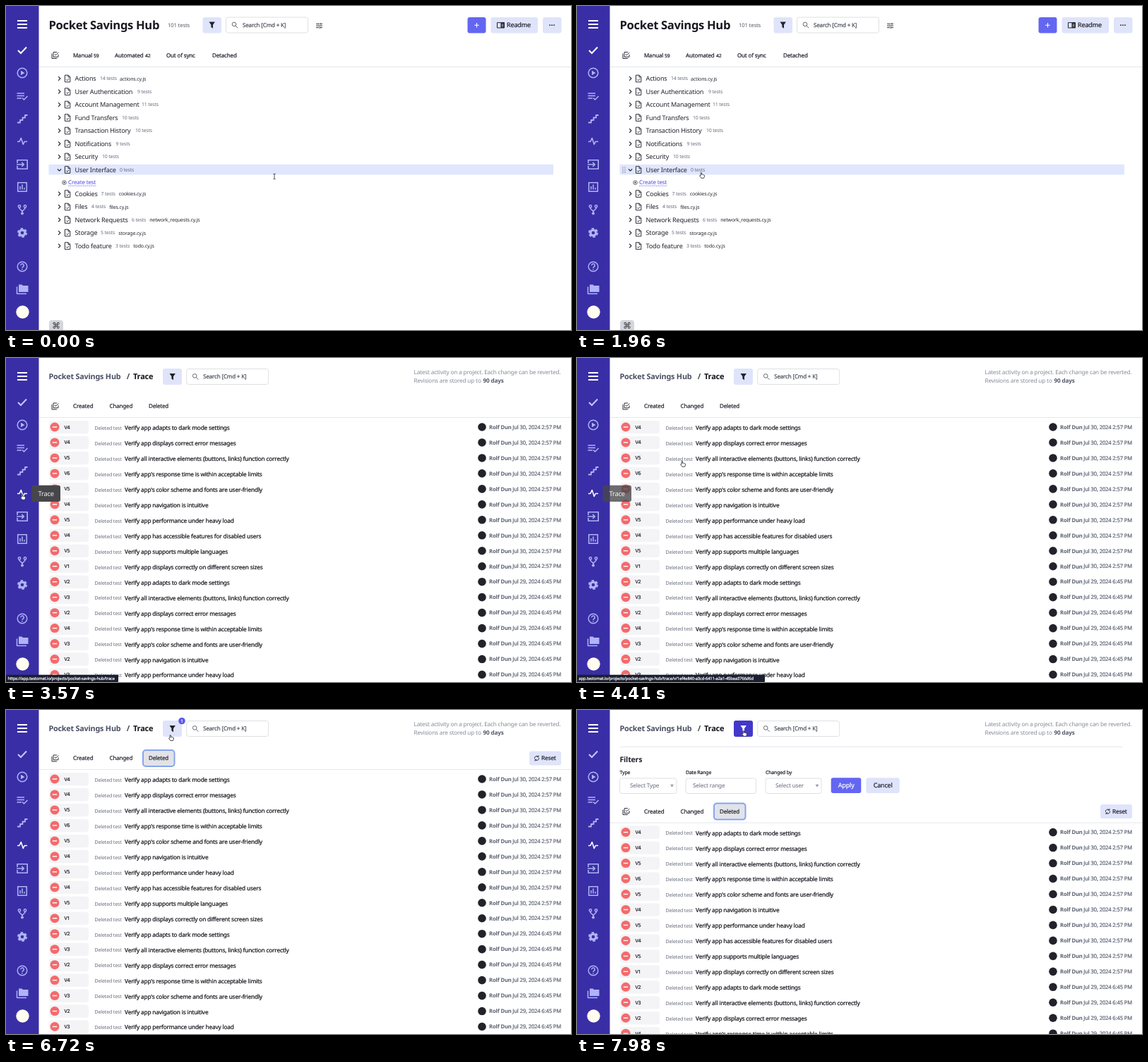
These frames come from a looping animation (800 by 460 pixels, 8 s). An HTML page:

```html
<!DOCTYPE html>
<html lang="en">
<head>
<meta charset="utf-8">
<title>Test project activity</title>
<style>
  html, body { margin: 0; width: 100%; height: 100%; overflow: hidden; background: #fff; }
  svg { display: block; width: 100%; height: 100%; }
  text { font-family: "Noto Sans", "Open Sans", sans-serif; letter-spacing: -.02em; white-space: pre; text-rendering: geometricPrecision; }
</style>
</head>
<body>
<svg id="stage" viewBox="0 0 800 460"></svg>
<script>
const LOOP = 8000, PANEL_SHIFT = 75.6;
const INK = '#22242e', GRAY = '#666b7c', PALE = '#dfe4fb', INDIGO = '#6366f1', LILAC = '#aeb4f6', LINE = '#e3e5ea';
const PROJECT = 'Pocket Savings Hub', PAGE = 'Trace';
const ADDRESS = 'app.testomat.io/projects/pocket-savings-hub/trace';

// y is the optical middle of the line; a hairline stroke gives the medium weight
const text = (x, y, size, str, fill = INK, weight = 400, anchor = 'start') =>
  `<text x="${x}" y="${y + size * .36}" font-size="${size}" fill="${fill}" font-weight="${weight === 500 ? 400 : weight}"
    text-anchor="${anchor}" ${weight === 500 ? `stroke="${fill}" stroke-width=".22"` : ''}>${str}</text>`;
const rect = (x, y, right, bottom, fill, r = 0, extra = '') =>
  `<rect x="${x}" y="${y}" width="${right - x}" height="${bottom - y}" rx="${r}" fill="${fill}" ${extra}/>`;
const circle = (x, y, r, fill, extra = '') => `<circle cx="${x}" cy="${y}" r="${r}" fill="${fill}" ${extra}/>`;
const stroke = (d, color = INK, width = 1) =>
  `<path d="${d}" fill="none" stroke="${color}" stroke-width="${width}" stroke-linejoin="round"/>`;
const solid = (d, fill) => `<path d="${d}" fill="${fill}"/>`;
const at = (x, y, body) => `<g transform="translate(${x} ${y})">${body}</g>`;
const group = (id, body) => `<g id="${id}">${body}</g>`;
const box = (x, y, right, bottom) => rect(x, y, right, bottom, '#fff', 3, 'stroke="#d6d8de" stroke-width=".8"');

const funnel = (x, y, fill) => at(x, y, solid('M-4.2-4.5H4.2L1.3-.3V4.8L-1.3 3V-.3Z', fill));
const search = (x, y) => box(x, y - 11, x + 116, y + 11) +
  at(x + 12.5, y, stroke('M1.2 1.2L4.2 4.2M1.8-1.1A2.8 2.8 0 1 1-3.8-1.1A2.8 2.8 0 1 1 1.8-1.1', '#555', .9)) +
  text(x + 23.5, y, 8, 'Search [Cmd + K]', '#4c505c', 500);
const checklist = (x, y) => at(x, y,
  stroke('M-4.5-2.5V4.5H2.5M4.5-1V2.3H-2.4V-4.5H2.5M-.7-1.5L1-.2L4.8-4', INK, .95));
const tab = (x, y, label) => text(x, y, 8, label, INK, 500);

function sidebar() {
  const icon = (y, d, width = 1.5) => at(23, y, stroke(d, LILAC, width));
  return rect(0, 0, 46.5, 460, '#3a2ea6') +
    at(23, 26, stroke('M-7-5H7M-7 0H7M-7 5H7', '#fff', 1.9)) +
    at(23, 63, `<path id="checkIcon" d="M-6 0L-2 4L6-4.5" fill="none" stroke-width="2"/>`) +
    icon(95, 'M6.8 0A6.8 6.8 0 1 1-6.8 0A6.8 6.8 0 1 1 6.8 0') + at(23, 95, solid('M-2-3.3L3.5 0L-2 3.3Z', LILAC)) +
    icon(128, 'M-7.5-4H3M-7.5-.5H3M-7.5 3H-1M0 2.5L2.5 5L7.5 0') +
    icon(160, 'M-7 5.5H-3V2H0.5V-1.5H4V-5H7.5', 1.8) +
    at(23, 192, `<path id="pulseIcon" d="M-7 .5H-4L-1.7-4.5L1.3 4.5L3.2 .5H7" fill="none" stroke-width="1.6" stroke-linejoin="round"/>`) +
    icon(225, 'M-7-2V-6.3H7.2V6.3H-7V2M-8 0H2M-.8-3L2.3 0L-.8 3', 1.6) +
    icon(257, 'M-6.3-6.3H6.3V6.3H-6.3ZM-3 3.5V-1M0 3.5V-3.5M3 3.5V1') +
    icon(289, 'M0 7V2.5L-4-1.5V-4M0 2.5L4-1.5V-4') +
    at(23, 289, circle(-4, -4.5, 1.7, '#3a2ea6', `stroke="${LILAC}" stroke-width="1.4"`) +
      circle(4, -4.5, 1.7, '#3a2ea6', `stroke="${LILAC}" stroke-width="1.4"`) + circle(0, 5.5, 1.9, LILAC)) +
    at(23, 322, circle(0, 0, 3.9, 'none', `stroke="${LILAC}" stroke-width="3.2"`) +
      circle(0, 0, 6, 'none', `stroke="${LILAC}" stroke-width="2" stroke-dasharray="3.4 2.883"`)) +
    icon(370, 'M6.8 0A6.8 6.8 0 1 1-6.8 0A6.8 6.8 0 1 1 6.8 0M-2.2-1.6A2.2 2.2 0 1 1 .8 .3Q0 .8 0 2M0 3V4.4', 1.4) +
    at(23, 402, solid('M-5-6.5H-.5L1-5H8.5V4H-5Z', LILAC) + stroke('M-7.5-3.5V6.5H6', LILAC, 1.5)) +
    circle(23.5, 434.5, 9.2, '#fffdf0');
}

const suites = [
  ['Actions', 14, 133, 'actions'], ['User Authentication', 9, 186], ['Account Management', 11, 192],
  ['Fund Transfers', 10, 164], ['Transaction History', 10, 183], ['Notifications', 9, 155.5],
  ['Security', 10, 136], ['User Interface', 0, 161], ['Cookies', 7, 134.5, 'cookies'], ['Files', 4, 121, 'files'],
  ['Network Requests', 6, 178, 'network_requests'], ['Storage', 5, 134, 'storage'], ['Todo feature', 3, 155, 'todo']];

function suiteRow([name, count, countX, file], i) {
  const y = 103 + 18.5 * i + (i > 7 ? 15.5 : 0);
  const chevron = i === 7 ? 'M-2.6-1L0 1.6L2.6-1' : 'M-1.4-2.8L1.4 0L-1.4 2.8';
  return at(75.5, y, stroke(chevron, INK, 1.1)) +
    at(87, y, stroke('M-3.6-4.8H1.2L3.8-2.2V4.9H-3.6ZM1-4.6V-2H3.6M-1.7 1.4L-.3 2.8L2.1 .2', INK, .95)) +
    text(97.5, y, 9.1, name) + text(countX, y, 6.9, count + ' tests', GRAY) +
    (file ? text(countX + (count > 9 ? 28 : 25.2), y, 7, file + '.cy.js') : '');
}

function testsPage() {
  return text(60.5, 27, 16.6, PROJECT, '#191a22', 600) + text(229, 27.5, 7.7, '101 tests', '#555a66') +
    rect(278.5, 16, 305, 38.5, PALE, 3) + funnel(291.7, 27, INK) + search(311.5, 27) +
    at(443.5, 28, stroke('M-4.5-2.7H.5M2.5-2.7H4.5M-4.5 0H-2.5M-.5 0H4.5M-4.5 2.7H-.5M1.5 2.7H4.5M1.8-4V-1.4M-1.5-1.3V1.3M.8 1.4V4', INK, .9)) +
    rect(653.5, 16, 679.5, 38.5, INDIGO, 3) + at(666.5, 27.2, stroke('M-3.3 0H3.3M0-3.3V3.3', '#fff', 1.1)) +
    rect(686.5, 16, 753, 38.5, PALE, 3) + at(700.5, 27.2,
      stroke('M-5-3.6H5V3.8H-5Z', INK, 1) + solid('M0-3.6H5V3.8H0Z', INK) + stroke('M1.3-1.3H4M1.3 .3H4M1.3 1.9H4', '#fff', .6)) +
    text(709, 27, 9.1, 'Readme', INK, 500) +
    rect(760, 16, 786.5, 38.5, PALE, 3) + [-3, 0, 3].map(d => circle(773 + d, 27.2, .9, INK)).join('') +
    checklist(69.5, 70) + tab(95, 70, 'Manual') + text(124, 70.3, 6.8, '59', INK, 500) +
    tab(154, 70, 'Automated') + text(197, 70.3, 6.8, '42', INK, 500) + tab(227, 70, 'Out of sync') + tab(292, 70, 'Detached') +
    stroke('M47 86.5H800', LINE, .9) + rect(60.5, 225, 775, 239.5, '#e0e6fd') +
    suites.map(suiteRow).join('') +
    group('handle', [0, 1, 2, 3].map(k => circle(65, 229.2 + 2.4 * k, .65, GRAY) + circle(68, 229.2 + 2.4 * k, .65, GRAY)).join('')) +
    circle(82.5, 250.7, 2.8, 'none', `stroke="${INK}" stroke-width=".7"`) + at(82.5, 250.7, stroke('M-1.5 0H1.5M0-1.5V1.5', INK, .7)) +
    text(88, 250.3, 8.05, 'Create test', '#4f46e5') +
    '<path d="M88 255.3H127.5" stroke="#4f46e5" stroke-width=".7" stroke-dasharray="1 .6"/>' +
    rect(61, 446, 81, 464, '#d3d6dc', 4) +
    '<text x="71" y="458" font-size="12" text-anchor="middle" fill="#333" style="font-family:\'DejaVu Sans\',sans-serif">⌘</text>';
}

const checks = {
  d: 'adapts to dark mode settings', e: 'displays correct error messages', n: 'navigation is intuitive',
  p: 'performance under heavy load', a: 'has accessible features for disabled users',
  l: 'supports multiple languages', s: 'displays correctly on different screen sizes' };
const titles = {
  i: 'Verify all interactive elements (buttons, links) function correctly',
  r: "Verify app's response time is within acceptable limits",
  c: "Verify app's color scheme and fonts are user-friendly" };
const rowKinds = 'deircnpalsdiercnp', versions = '44565454512324323';

function activityRow(kind, i) {
  const y = 98 + 21.97 * i;
  return rect(61, y - 9, 117, y + 9.3, '#f4f4f6', 4) + circle(69, y, 6.5, '#f46a6c') +
    at(69, y, stroke('M-3.2 0H3.2', '#fff', 1.4)) + text(82.5, y, 7, 'V' + versions[i], INK, 500) +
    text(125.5, y + 1.3, 7, 'Deleted test', GRAY) +
    text(168, y + 1, 8.27, titles[kind] || 'Verify app ' + checks[kind], '#15161c', 500) +
    circle(674, y, 5.8, '#22232a') + text(684, y, 7.7, 'Rolf Dun', '#5a6070', 600) +
    text(786, y, 7.65, `Jul ${i < 10 ? '30, 2024 2:57' : '29, 2024 6:45'} PM`, '#5f6475', 500, 'end');
}

function filterPanel() {
  const caret = x => at(x, 107.5, solid('M-2.4-1.8H2.4L0 2.2Z', '#999ca6'));
  return stroke('M61 52.3H773', LINE, .9) + text(60.5, 70.5, 10.6, 'Filters', INK, 600) +
    text(60.5, 89, 6.9, 'Type', INK, 500) + text(154, 89, 6.9, 'Date Range', INK, 500) + text(267, 89, 6.9, 'Changed by', INK, 500) +
    box(60.5, 97, 141, 118.5) + box(154, 97, 253.5, 118.5) + box(267, 97, 346, 118.5) +
    text(75, 107.5, 8.2, 'Select Type', GRAY) + text(164, 107.5, 8.2, 'Select range', GRAY) + text(281, 107.5, 8.2, 'Select user', GRAY) +
    caret(134.5) + caret(340) +
    rect(359.7, 96.2, 402.3, 118, INDIGO, 3) + text(381.2, 107, 9, 'Apply', '#fff', 500, 'middle') +
    rect(409.3, 96.2, 456.7, 118, PALE, 3) + text(433.2, 107, 9, 'Cancel', INK, 500, 'middle');
}

function activityPage() {
  const filtered = rect(194, 57, 238.5, 80, '#e2e3e8', 4, 'stroke="#86a5f0" stroke-width="2"') +
    rect(741, 58.5, 786, 78.5, PALE, 3) +
    at(751.5, 68.5, stroke('M-3 .6A3 3 0 0 1 2-2.2M3-.6A3 3 0 0 1-2 2.2M2.4-4V-1.9H.3M-2.4 4V1.9H-.3', INK, .95)) +
    text(758, 68.5, 8.3, 'Reset', INK, 500);
  return text(60.5, 26.3, 10.8, PROJECT, '#4b5063', 600) + text(171, 26.3, 11, '/', INK, 500) +
    text(180, 26.3, 11, PAGE, '#15161c', 600) +
    group('focus', rect(221, 14, 250.5, 39, 'none', 4, 'stroke="#dcdee6"')) +
    rect(222, 15, 249, 38, PALE, 3) + funnel(235.7, 26.5, INK) +
    group('filterOn', rect(222, 15, 249, 38, '#4338ca', 3) + funnel(235.7, 26.5, '#fff')) +
    search(255.7, 26.5) +
    group('badge', circle(249, 15.5, 4.8, '#5b5be8') + text(249, 15.5, 6.2, '1', '#fff', 500, 'middle')) +
    text(577.5, 20.3, 8.2, 'Latest activity on a project. Each change can be reverted.', '#858a98') +
    text(577.5, 32.5, 8.2, 'Revisions are stored up to', '#858a98') + text(675.5, 32.5, 8.2, '90 days', '#555a6b', 600) +
    group('panel', filterPanel()) +
    group('list', group('filtered', filtered) + checklist(69.5, 68.5) +
      tab(95, 68.3, 'Created') + tab(146.5, 68.3, 'Changed') + tab(202, 68.3, 'Deleted') +
      stroke('M47 84.5H800', LINE, .9) + [...rowKinds].map(activityRow).join(''));
}

const statusBar = (id, width, str) => group(id, rect(0, 449.7, width, 460, '#1b1f30', 1) + text(2.5, 455, 5.8, str, '#fff', 500));

document.getElementById('stage').innerHTML =
  group('tests', testsPage()) + group('activity', activityPage()) + sidebar() +
  statusBar('pageLink', 159, 'https://' + ADDRESS) +
  statusBar('rowLink', 266, ADDRESS + '/v/1ef4e840-a3cd-6411-a2a1-45bea3766d6d') +
  statusBar('hashLink', 162, 'https://' + ADDRESS + '#') +
  group('tooltip', rect(36.3, 180.7, 77, 204, '#47474b', 3) + text(56.7, 192.3, 9.4, PAGE, '#f2f2f2', 400, 'middle')) +
  '<circle id="ripple" fill="#7d95f2" fill-opacity=".38" stroke="#7890ea" stroke-width="1"/>' +
  group('cursor',
    group('beam', stroke('M-1.6-3.8Q0-3.8 0-2.8Q0-3.8 1.6-3.8M0-2.8V2.8M-1.6 3.8Q0 3.8 0 2.8Q0 3.8 1.6 3.8', '#222', .8)) +
    group('hand', '<path d="M-1.9 .8V-3.2Q-1.2-4.4-.5-3.2V-.8Q.4-1.4 1-.5Q1.9-1 2.3-.1Q3.5-.3 3.5 .8Q3.6 2.8 2.6 4.3H-1.2Q-2 2.8-3.4 1.2Q-3.3 .1-1.9 .8Z" fill="#fff" stroke="#222" stroke-width=".8" stroke-linejoin="round"/>'));

const el = id => document.getElementById(id);
const show = (id, on) => { el(id).style.display = on ? '' : 'none'; };
const clamp = v => Math.max(0, Math.min(1, v));
const ramp = (t, from, to) => clamp((t - from) / (to - from));

// time, x, y of the pointer
const pointerPath = [[0, 380, 242], [1960, 177, 240], [2450, 24, 197], [4200, 24, 197], [4410, 150, 150],
  [4900, 216, 75], [6160, 216, 75], [6900, 237, 33]];

function pointerAt(t) {
  const next = pointerPath.findIndex(key => key[0] > t);
  if (next < 0) return pointerPath.at(-1).slice(1);
  const [t0, x0, y0] = pointerPath[next - 1], [t1, x1, y1] = pointerPath[next];
  const p = ramp(t, t0, t1), eased = p * p * (3 - 2 * p);
  return [x0 + (x1 - x0) * eased, y0 + (y1 - y0) * eased];
}

function render(t) {
  const during = (from, to = LOOP) => t >= from && t < to;
  const onActivity = t >= 3220, panelOpen = t >= 7840;
  show('tests', !onActivity);
  show('activity', onActivity);
  show('handle', during(700, 2150));
  show('filtered', t >= 5390);
  show('badge', during(5390, 7840));
  show('focus', during(7560, 7840));
  show('filterOn', panelOpen);
  show('panel', panelOpen);
  el('list').setAttribute('transform', `translate(0 ${panelOpen ? PANEL_SHIFT : 0})`);
  show('pageLink', during(2450, 4270));
  show('rowLink', during(4340, 4620));
  show('hashLink', during(4760, 6230));
  el('checkIcon').setAttribute('stroke', onActivity ? '#c3c7fa' : '#fff');
  el('pulseIcon').setAttribute('stroke', t >= 2450 ? '#fff' : LILAC);
  el('tooltip').style.opacity = ramp(t, 2500, 2640) * (1 - ramp(t, 4360, 4600));

  const [x, y] = pointerAt(t);
  el('cursor').setAttribute('transform', `translate(${x} ${y})`);
  show('beam', t < 700);
  show('hand', t >= 700);

  const clickStart = t < 7000 ? 5320 : 7560;
  show('ripple', during(clickStart, clickStart + 280));
  el('ripple').setAttribute('cx', x - 1);
  el('ripple').setAttribute('cy', y - 3);
  el('ripple').setAttribute('r', 4 + 6.5 * ramp(t, clickStart, clickStart + 140));
}

function frame() {
  render(performance.now() % LOOP);
  requestAnimationFrame(frame);
}
frame();
</script>
</body>
</html>
```
